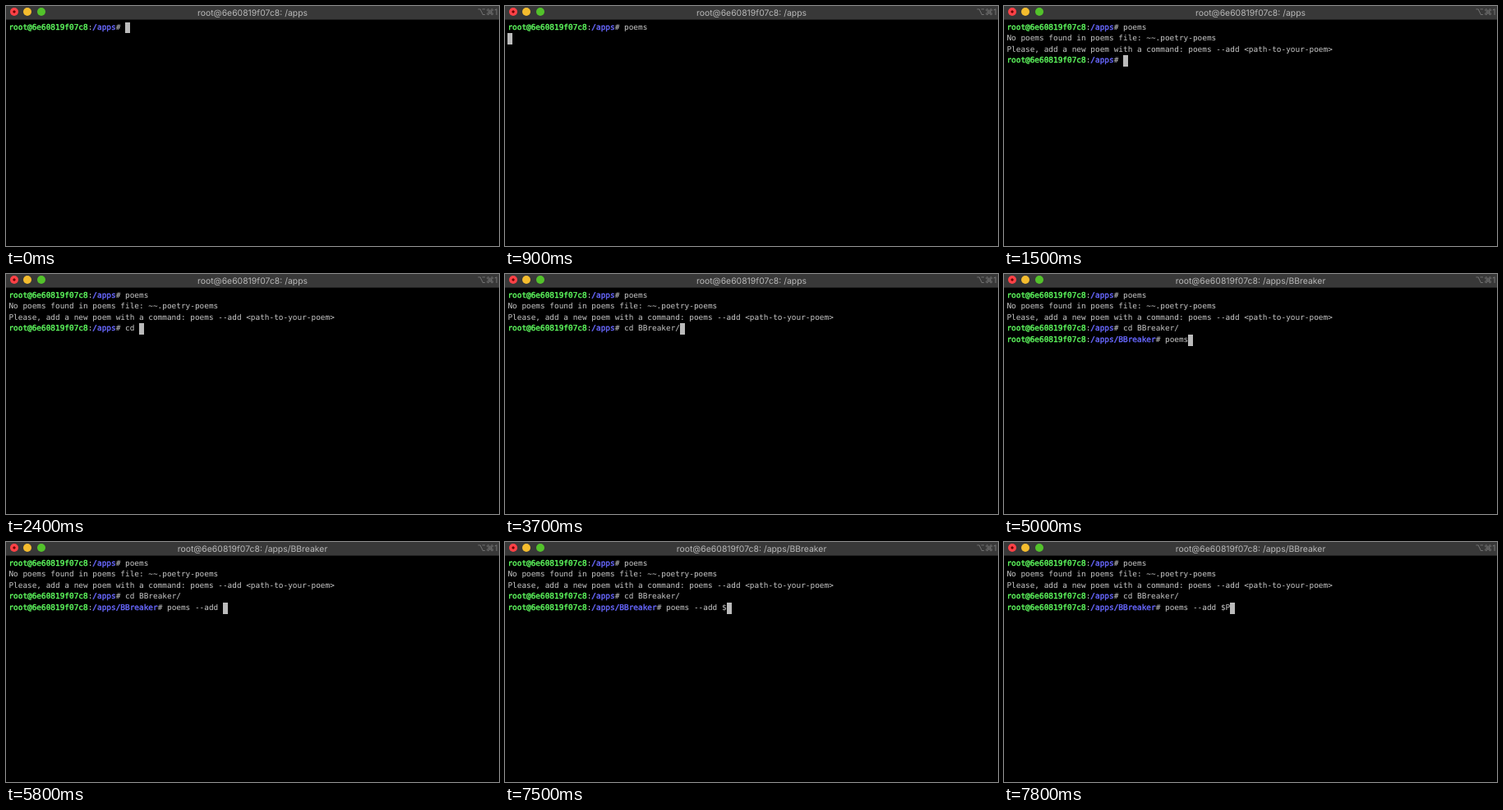
An HTML page that plays this animation: 600 by 293 pixels, repeating every 8000 ms.

```html
<!DOCTYPE html>
<html lang="en">
<head>
<meta charset="utf-8">
<title>Terminal</title>
<style>
html, body { margin: 0; width: 100%; height: 100%; overflow: hidden; background: #000; }
body { position: relative; text-rendering: geometricPrecision; }
#bar { position: absolute; inset: 0 0 auto; height: 16px; background: #383838; border-bottom: 1px solid #222; }
#bar i { position: absolute; top: 2.3px; width: 10px; height: 10px; border-radius: 50%; }
#title { position: absolute; top: 1px; width: 100%; text-align: center; color: #b8b8b8; font: 10.42px/15px Inter, sans-serif; }
#hint { position: absolute; top: 1px; right: 1.5px; color: #7a7a7a; font: 10.3px/15px Inter, "DejaVu Sans", sans-serif; }
#screen { position: absolute; left: 3.4px; top: 19.5px; margin: 0; color: #c8c8c8; font: 9.41px/13.65px "DejaVu Sans Mono", monospace; }
b { font-weight: normal; -webkit-text-stroke: .4px; color: #60ff60; }
b.path { color: #6868ff; }
#cursor { display: inline-block; width: 6px; height: 13.4px; vertical-align: top; background: #bbb; }
</style>
</head>
<body>
<div id="bar">
  <i style="left:5.4px;background:radial-gradient(#6b0000 1.2px, #ff4146 2px)"></i>
  <i style="left:21.2px;background:#f4bc2e"></i>
  <i style="left:37.5px;background:#53c22b"></i>
  <div id="title"></div>
  <div id="hint">⌥⌘1</div>
</div>
<pre id="screen"></pre>
<script>
const LOOP = 8000, CD_TIME = 3800;
const host = 'root@6e60819f07c8';
const prompt = path => `<b>${host}</b>:<b class="path">${path}</b># `;

// Terminal output and keystrokes: [time in ms, markup appended]
const stream = [
  [0, prompt('/apps')],
  [500, 'p'], [600, 'o'], [700, 'em'], [800, 's'], [900, '\n'],
  [1300, 'No poems found in poems file: ~~.poetry-poems\n' +
    'Please, add a new poem with a command: poems --add &lt;path-to-your-poem>\n' + prompt('/apps')],
  [2200, 'c'], [2300, 'd'], [2400, ' '], [2500, 'B'], [2700, 'B'], [3100, 'reaker/'],
  [CD_TIME, '\n' + prompt('/apps/BBreaker')],
  [4600, 'p'], [4700, 'o'], [4800, 'e'], [4900, 'm'], [5000, 's'], [5100, ' '],
  [5200, '--'], [5300, 'a'], [5500, 'd'], [5600, 'd'], [5800, ' '],
  [7500, '$'], [7800, 'P']
];

const screenEl = document.getElementById('screen');
const titleEl = document.getElementById('title');
let shown = 0;

function draw() {
  const t = performance.now() % LOOP;
  const due = stream.filter(([time]) => time <= t);
  if (due.length !== shown) {
    shown = due.length;
    screenEl.innerHTML = due.map(([, text]) => text).join('') + '<span id="cursor"></span>';
    titleEl.textContent = `${host}: /apps${t >= CD_TIME ? '/BBreaker' : ''}`;
  }
  requestAnimationFrame(draw);
}
draw();
</script>
</body>
</html>
```
